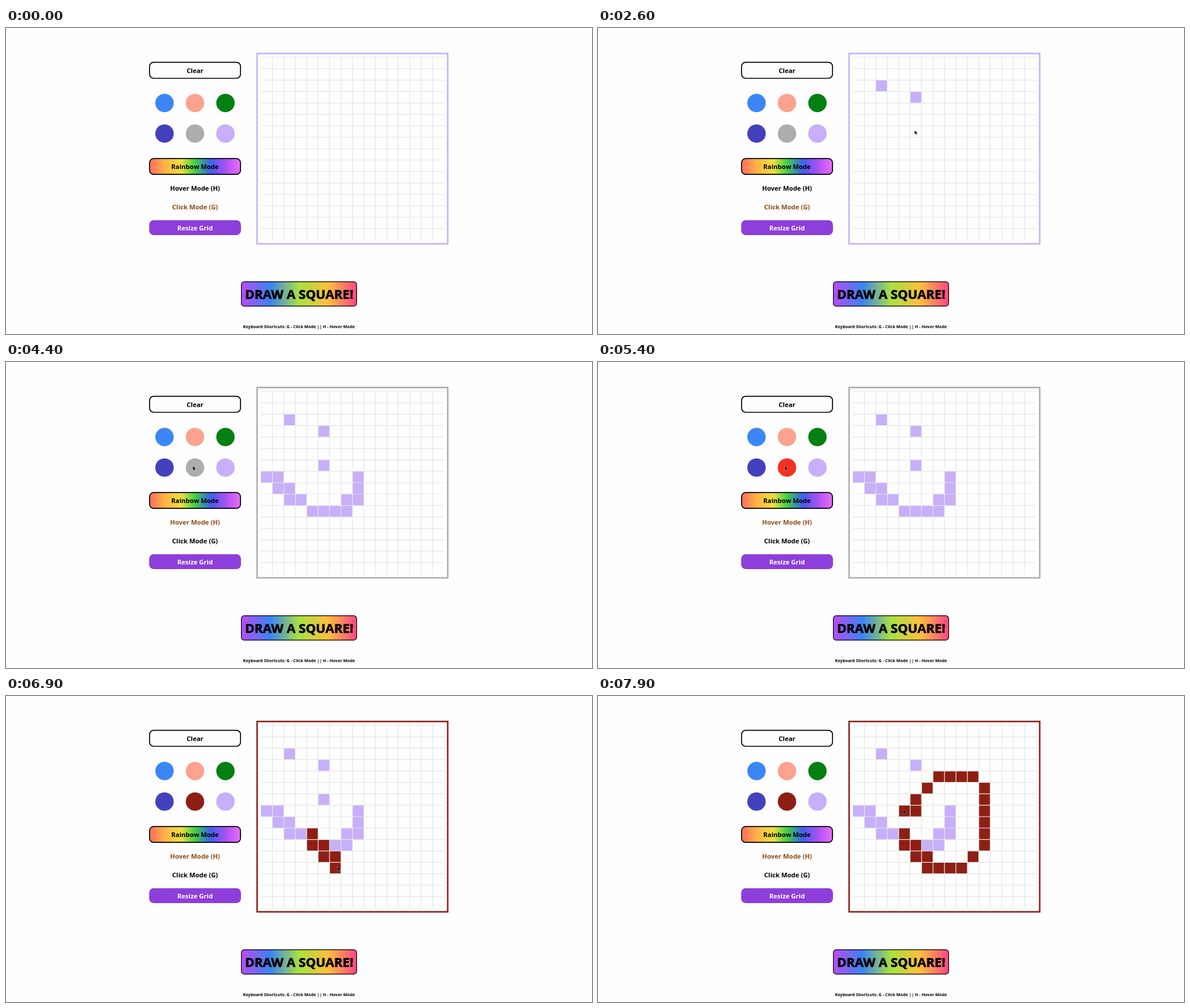
Recreate the animation shown at these times as an HTML page. Size 1000 px wide and 523 px high, loop 8 s.

```html
<!DOCTYPE html>
<html lang="en">
<head>
<meta charset="utf-8">
<title>Grid drawing</title>
<style>
  html, body { margin: 0; width: 100%; height: 100%; overflow: hidden; background: #fefefe; }
  svg { display: block; width: 100%; height: 100%; }
  text { font: 600 11px "Noto Sans", "Open Sans", sans-serif; text-anchor: middle; }
  .title { font-size: 21.7px; font-weight: 700; stroke: #000; stroke-width: .7; stroke-linejoin: round; }
  .note { font-size: 7.2px; font-weight: 700; }
</style>
</head>
<body>
<svg viewBox="0 0 1000 523">
  <defs>
    <linearGradient id="rainbow">
      <stop offset="0" stop-color="#fe6c62"/>
      <stop offset=".17" stop-color="#fdb544"/>
      <stop offset=".35" stop-color="#eede3e"/>
      <stop offset=".5" stop-color="#3fd043"/>
      <stop offset=".67" stop-color="#3f5ff0"/>
      <stop offset=".83" stop-color="#a650f4"/>
      <stop offset="1" stop-color="#ea6ff6"/>
    </linearGradient>
    <linearGradient id="banner">
      <stop offset="0" stop-color="#b94bf2"/>
      <stop offset=".25" stop-color="#3b83f3"/>
      <stop offset=".5" stop-color="#a8e03f"/>
      <stop offset=".75" stop-color="#fbc03e"/>
      <stop offset="1" stop-color="#fd4585"/>
    </linearGradient>
  </defs>

  <g stroke="#000" stroke-width="1.7">
    <rect x="245" y="58.6" width="155.2" height="27.4" rx="7" fill="#fefefe"/>
    <rect x="245" y="223.2" width="155.2" height="27" rx="7" fill="url(#rainbow)"/>
  </g>
  <rect x="244.3" y="328.5" width="156.7" height="25.6" rx="8" fill="#8d3edb"/>
  <text x="322.6" y="76.5">Clear</text>
  <text x="322.6" y="241">Rainbow Mode</text>
  <text id="hoverMode" x="322.6" y="278.3">Hover Mode (H)</text>
  <text id="clickMode" x="322.6" y="309.7">Click Mode (G)</text>
  <text x="322.6" y="345.5" fill="#fff">Resize Grid</text>
  <g id="swatches"></g>

  <rect id="frame" x="428.5" y="43.6" width="325.3" height="325.3" fill="#fefefe" stroke-width="2.6"/>
  <g id="cells"></g>
  <path id="lines" fill="none" stroke="#e6e6e6" stroke-width="1.2"/>

  <rect x="401.6" y="433.6" width="196.8" height="41.8" rx="5" fill="url(#banner)" stroke="#000" stroke-width="1.2"/>
  <text class="title" x="500.3" y="462.5">DRAW A SQUARE!</text>
  <text class="note" x="500" y="512.5">Keyboard Shortcuts: G - Click Mode || H - Hover Mode</text>

  <path id="cursor" d="M0 0V6.4L1.5 5.1L2.6 7.4L3.6 7L2.7 4.8H4.6Z" stroke="#fff" stroke-width=".6" paint-order="stroke"/>
</svg>
<script>
const LOOP = 8000, STEP = 100, TRAVEL = 250;
const LEFT = 435, TOP = 50, COUNT = 16, CELL = 19.53;
const LILAC = '#c7aff9', GREY = '#adadad', RED = '#f63022', DARK_RED = '#8e1f14', BROWN = '#8f4a15';
const ENTER = 1400, HOVER_ON = 3100, PICKER_OPEN = 4400, PICKER_CLOSE = 6600;

const $ = id => document.getElementById(id);
const clamp = k => Math.min(1, Math.max(0, k));
const lerp = (a, b, k) => a + (b - a) * k;
const mix = (a, b, k) => `color-mix(in srgb, ${b} ${clamp(k) * 100}%, ${a})`;
const between = (a, b, k) => ({ x: lerp(a.x, b.x, k), y: lerp(a.y, b.y, k) });

function add(parent, tag, attrs) {
  const el = document.createElementNS('http://www.w3.org/2000/svg', tag);
  for (const key in attrs) el.setAttribute(key, attrs[key]);
  return parent.appendChild(el);
}

const swatches = ['#3b86f4', '#fca28f', '#038012', '#4340bb', GREY, LILAC].map((fill, i) =>
  add($('swatches'), 'circle', { cx: 270.5 + i % 3 * 52, cy: 128.2 + Math.floor(i / 3) * 52.2, r: 15.7, fill }));

let grid = `M${LEFT} ${TOP}h${COUNT * CELL}`;
for (let i = 1; i < COUNT; i++) {
  grid += `M${LEFT + i * CELL} ${TOP}v${COUNT * CELL}M${LEFT} ${TOP + i * CELL}h${COUNT * CELL}`;
}
$('lines').setAttribute('d', grid);

const cells = [];
function paint(col, row, fill, at) {
  const el = add($('cells'), 'rect', { x: LEFT + col * CELL, y: TOP + row * CELL, width: CELL, height: CELL, fill });
  cells.push({ el, at });
  return { x: LEFT + (col + .4) * CELL, y: TOP + (row + .4) * CELL };
}

// A stop is a stretch of time in which the pointer follows its points.
const rest = (arrive, leave, x, y) => ({ arrive, leave, points: [{ x, y }] });
const click = (arrive, leave, col, row) => ({ arrive, leave, points: [paint(col, row, LILAC, leave)] });

// Walks from cell to cell by compass moves, painting each one.
function walk(arrive, leave, fill, col, row, route) {
  const moves = route.split(' ');
  const points = [paint(col, row, fill, arrive)];
  moves.forEach((move, i) => {
    col += move.includes('E') - move.includes('W');
    row += move.includes('S') - move.includes('N');
    points.push(paint(col, row, fill, lerp(arrive, leave, (i + 1) / moves.length)));
  });
  return { arrive, leave, points };
}

const stops = [
  rest(ENTER, ENTER, 524.5, 132),
  click(1600, 1900, 2, 2),
  click(2200, 2300, 5, 3),
  click(2600, 2700, 5, 6),
  walk(HOVER_ON, 3870, LILAC, 8, 7, 'S S W S W W W NW W N W N W'),
  rest(4200, 6500, 319, 178),
  walk(PICKER_CLOSE, 7900, DARK_RED, 4, 9, 'S E S E S E E E NE NE N N N N N NW W W W SW SW S W')
];

function pointer(t) {
  const i = stops.findLastIndex(stop => stop.arrive <= t);
  const { arrive, leave, points } = stops[i], next = stops[i + 1];
  const last = points.length - 1;
  if (t < leave) {
    const place = (t - arrive) / (leave - arrive) * last, n = Math.floor(place);
    return between(points[n], points[Math.min(n + 1, last)], place - n);
  }
  if (!next) return points[last];
  const start = Math.max(leave, next.arrive - TRAVEL);
  return between(points[last], next.points[0], clamp((t - start) / (next.arrive - start)));
}

function render(t) {
  for (const { el, at } of cells) el.style.display = t >= at ? '' : 'none';
  const hovering = t >= HOVER_ON;
  $('hoverMode').style.fill = hovering ? BROWN : '#000';
  $('clickMode').style.fill = hovering ? '#000' : BROWN;
  $('frame').style.stroke = t < PICKER_OPEN ? LILAC : t < PICKER_CLOSE ? GREY : DARK_RED;
  swatches[4].style.fill = t <= 5400 ? mix(GREY, RED, (t - 4900) / 500) : mix(RED, DARK_RED, (t - 5500) / 200);
  $('cursor').style.display = t >= ENTER ? '' : 'none';
  if (t >= ENTER) {
    const { x, y } = pointer(t);
    $('cursor').setAttribute('transform', `translate(${x} ${y})`);
  }
}

const start = performance.now();
function tick() {
  const t = (performance.now() - start) % LOOP;
  render(Math.floor(t / STEP) * STEP);
  requestAnimationFrame(tick);
}
tick();
</script>
</body>
</html>
```
